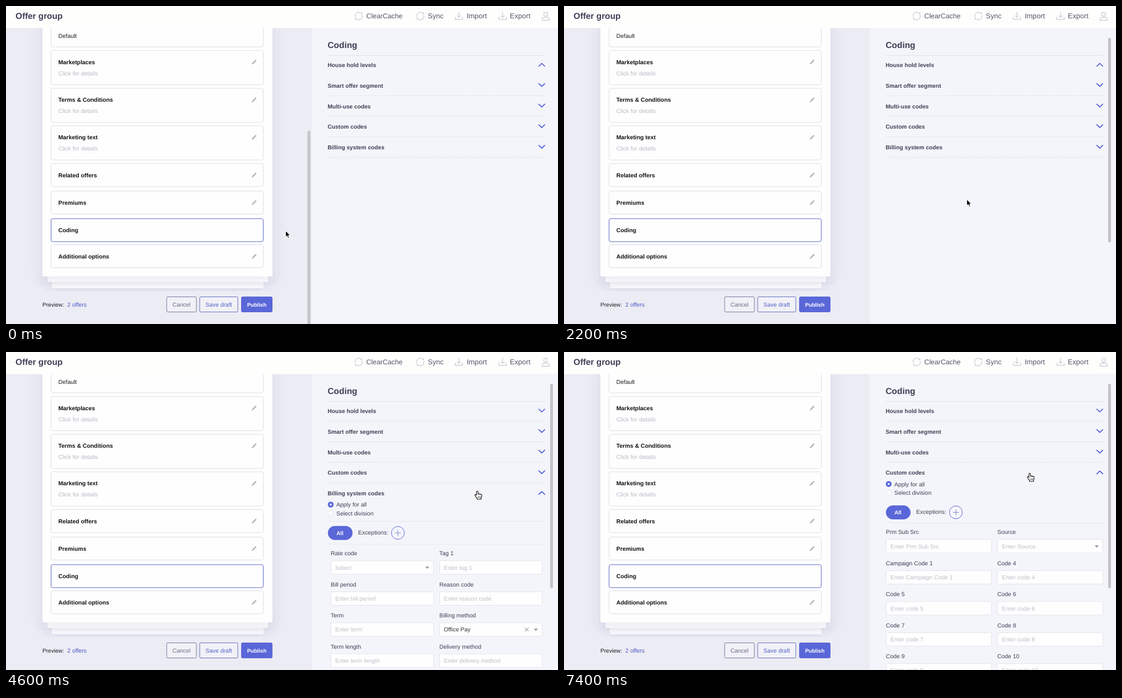
Write an HTML page that moves like this. It is 986 by 568 pixels and loops after 8 s.

```html
<!DOCTYPE html>
<html lang="en">
<head>
<meta charset="utf-8">
<title>Offer group</title>
<style>
html, body { margin: 0; height: 100%; overflow: hidden; }
svg { display: block; width: 986px; height: 568px; background: #ececf4; }
text { font: 10.4px "Liberation Sans", Arial, sans-serif; text-rendering: geometricPrecision; white-space: pre; }
.b { font-weight: bold; }
.mid { text-anchor: middle; }
.line { fill: none; stroke-linecap: round; stroke-linejoin: round; }
</style>
</head>
<body>
<svg viewBox="0 0 986 568">
  <defs>
    <filter id="shadow" x="-20%" y="-20%" width="140%" height="140%">
      <feDropShadow dx="0" dy="4" stdDeviation="12" flood-color="#50508c" flood-opacity=".13"/>
    </filter>
  </defs>
  <g id="page"></g>
  <g id="panel"></g>
  <rect id="bar" width="5" rx="2" fill="#c2c2c7"/>
  <path id="arrow" d="M0 0V11.2L2.6 8.8 4.3 12.8 6.3 12 4.6 8.2H8Z" fill="#000" stroke="#fff" stroke-width=".9"/>
  <g id="hand" stroke="#111" stroke-width="1.1" stroke-linejoin="round">
    <path fill="#fff" d="M-2 1.2C-2-.9.6-.9.7 1.2V5c.3-1 2.2-1 2.4.3.3-1 2-1 2.3.4.4-.8 2-.6 2 .9 0 3-.2 4-1.2 5.5V14H-1v-1.8C-2.5 10.5-4 9-4.8 7.3-5.4 5.8-3.6 5-2.6 6.2L-2 7Z"/>
    <path fill="none" stroke-width=".8" d="M.8 8.8v3M2.9 8.8v3M5 8.8v3"/>
  </g>
</svg>
<script>
const $ = id => document.getElementById(id);
const BLUE = '#5a67d8', INK = '#3f3f56', PALE = '#b9bac6';

const text = (x, y, s, fill = INK, cls = '', size = 10.4) =>
  `<text x="${x}" y="${y}" fill="${fill}" class="${cls}" style="font-size:${size}px">${s}</text>`;
const box = (x, y, w, h, stroke = 'none', fill = '#fefefe', r = 3, more = '') =>
  `<rect x="${x}" y="${y}" width="${w}" height="${h}" rx="${r}" stroke="${stroke}" fill="${fill}" ${more}/>`;
const line = (d, stroke, width = 1, more = '') =>
  `<path class="line" d="${d}" stroke="${stroke}" stroke-width="${width}" ${more}/>`;
const disc = (x, y, r, fill, stroke = 'none') =>
  `<circle cx="${x}" cy="${y}" r="${r}" fill="${fill}" stroke="${stroke}"/>`;
const rule = y => line(`M575 ${y}H963`, '#dfe0ea', 1, 'stroke-dasharray="1 1.6"');
const caret = (x, y) => `<path d="M${x - 3.5} ${y - 1.5}h7l-3.5 3.7z" fill="#8b8b92"/>`;

function pageMarkup() {
  const card = (y, h, title, hint) =>
    box(80.5, y, 379, h, title === 'Coding' ? '#5c69c4' : '#dedee6') +
    text(93.5, y + (hint ? 24 : 24.3), title, '#121216', 'b', 10.35) +
    (hint ? text(93.5, y + 44.3, 'Click for details', PALE) : '') +
    (title === 'Coding' ? '' : line(`M439.8 ${y + 24.3}l.6-1.8 5.4-5.6 1 1-5.6 5.6z`, '#b4b4bc', 1.3));
  const refresh = x => line(`M${x - 6} 19.5a6.2 6.2 0 0 1 10.4-6.2l1.2 1.2v-3M${x + 6} 16.5a6.2 6.2 0 0 1-10.4 6.2l-1.2-1.2v3`, PALE);
  const tray = x => line(`M${x} 11v9.5m-3.5-3.5l3.5 3.5 3.5-3.5M${x - 6.5} 20v4h13v-4`, PALE);
  const button = (x, w, label, stroke, ink, fill, cls = '', size) =>
    box(x, 519.5, w, 27, stroke, fill, 2) + text(x + w / 2, 537, label, ink, 'mid ' + cls, size);

  return box(82, 480, 378, 24, 'none', '#fafafc', 3, 'filter="url(#shadow)"') +
    box(74, 470, 394, 23, 'none', '#fcfcfd', 3, 'filter="url(#shadow)"') +
    box(65, 20, 411, 463, 'none', '#fefefe', 3, 'filter="url(#shadow)"') +
    box(80.5, 20, 379, 53, '#dedee6') + text(93.5, 56.7, 'Default', '#1c1c22') +
    card(79.5, 61, 'Marketplaces', 1) + card(147, 61, 'Terms &amp; Conditions', 1) +
    card(214, 61, 'Marketing text', 1) + card(281.5, 41, 'Related offers') +
    card(330.5, 41, 'Premiums') + card(379.9, 41, 'Coding') + card(426.6, 41, 'Additional options') +
    text(65, 537, 'Preview:', '#1c1c22', '', 10.1) + text(109.5, 537, '2 offers', '#4c59c4') +
    button(287, 53, 'Cancel', '#747b9e', '#6b6d85', '#f1f1f7') +
    button(346, 68, 'Save draft', '#6470c0', '#5360c4', '#f1f1f7') +
    button(420.5, 55, 'Publish', BLUE, '#fff', BLUE, 'b', 9.6) +
    box(545, 40, 441, 528, 'none', '#f4f5fa', 0) + line('M545 40V568', '#e3e4ee') +
    box(0, 0, 986, 39.5, 'none', '#fefefd', 0) +
    text(17, 23, 'Offer group', INK, 'b', 15.3) +
    refresh(630) + text(643.5, 21.5, 'ClearCache', '#55556a', '', 12.3) +
    refresh(740) + text(753.5, 21.5, 'Sync', '#55556a', '', 12.6) +
    tray(809) + text(823, 21.5, 'Import', '#55556a', '', 12.7) +
    tray(887) + text(900, 21.5, 'Export', '#55556a', '', 12.7) +
    disc(964, 14.7, 3.6, 'none', PALE) + line('M957.5 25v-1.5q0-3.5 4-3.5h5q4 0 4 3.5v1.5z', PALE) +
    text(574.5, 75, 'Coding', INK, 'b', 15.4) + line('M575 88.5H963', '#dfe0ea');
}

const sections = ['House hold levels', 'Smart offer segment', 'Multi-use codes', 'Custom codes', 'Billing system codes'];
const rowY = i => 105.3 + 36.7 * i;

// Each field: label, placeholder, kind
const forms = {
  3: [['Prm Sub Src', 'Enter Prm Sub Src'], ['Source', 'Enter Source', 'select'],
      ['Campaign Code 1', 'Enter Campaign Code 1'],
      ...[4, 5, 6, 7, 8, 9, 10].map(n => ['Code ' + n, 'Enter code ' + n])],
  4: [['Rate code', 'Select', 'select'], ['Tag 1', 'Enter tag 1'],
      ['Bill period', 'Enter bill period'], ['Reason code', 'Enter reason code'],
      ['Term', 'Enter term'], ['Billing method', 'Office Pay', 'chosen'],
      ['Term length', 'Enter term length'], ['Delivery method', 'Enter delivery method']]
};

function formMarkup(open) {
  const y = rowY(open), inset = open === 4 ? 5 : 0, top = y + (open === 4 ? 107.4 : 106.2);
  const fields = forms[open].map(([label, hint, kind], i) => {
    const right = i % 2, x = right ? 774 : 575 + inset, w = 189 - inset;
    const cy = top + 55.4 * (i >> 1), mid = cy + 25.4;
    return text(x, cy + 3.8, label) +
      box(x + .5, mid - 12, w - 1, 24, '#e4e5ec', '#fefefe', 2) +
      text(x + 8, mid + 3.7, hint, kind === 'chosen' ? '#33333c' : '#bfc0c9') +
      (kind ? caret(x + w - 11.5, mid) : '') +
      (kind === 'chosen' ? line(`M927 ${mid - 3}l6 6m0-6l-6 6`, '#77777f') : '');
  });
  return disc(580, y + 20.4, 5.2, BLUE) + disc(580, y + 20.4, 1.8, '#fff') +
    text(590, y + 24.2, 'Apply for all') +
    disc(580, y + 36, 4.8, '#fefefe', '#e1e2ea') + text(590, y + 39.8, 'Select division') +
    (open === 4 ? rule(y + 50.5) : '') +
    box(575, y + 58.6, 44, 25, 'none', BLUE, 12.5) + text(596.5, y + 75, 'All', '#fff', 'mid b', 9.8) +
    text(629, y + 73.7, 'Exceptions:') + disc(700, y + 71, 11.5, '#f6f7fc', BLUE) +
    line(`M695 ${y + 71}h10m-5-5v10`, '#7c86c8') +
    rule(y + (open === 4 ? 91 : 90)) + fields.join('');
}

function panelMarkup(open) {
  const shown = open ? sections.slice(0, open + 1) : sections;
  return shown.map((name, i) => {
    const y = rowY(i), up = i === open;
    return text(574.5, y + 3.8, name, INK, 'b', 10.2) +
      line(`M951.7 ${y + (up ? 2.2 : -3.3)}l5.3 ${up ? -5 : 5} 5.3 ${up ? 5 : -5}`, '#4956d4', 1.6) +
      (up ? '' : rule(y + 18.3));
  }).join('') + (open ? formMarkup(open) : '');
}

// Pointer path: time, x, y
const path = [[0, 499.5, 401.5], [200, 499.5, 401.5], [1200, 288.5, 394], [1400, 288.5, 394],
  [2200, 719.5, 345.5], [2600, 719.5, 345.5], [3600, 841.5, 250], [4200, 842.5, 249],
  [6000, 842.5, 249], [6800, 836, 226], [7400, 832.5, 217], [8000, 832.5, 217]];

function pointer(t) {
  const i = path.findIndex(p => p[0] > t), [a, ax, ay] = path[i - 1], [b, bx, by] = path[i];
  const k = (t - a) / (b - a), e = k * k * (3 - 2 * k);
  return [ax + (bx - ax) * e, ay + (by - ay) * e];
}

let current = -1;
function frame(now) {
  const t = Math.floor(now % 8000 / 200) * 200;
  const open = t >= 7400 ? 3 : t >= 4600 && t < 6000 ? 4 : 0;
  if (open !== current) $('panel').innerHTML = panelMarkup(current = open);

  const [x, y] = pointer(t), left = x < 545;
  const hot = left ? x < 460 && y > 380 && y < 421
    : sections.some((_, i) => Math.abs(y - rowY(i)) < 10);
  $('arrow').style.display = hot ? 'none' : '';
  $('hand').style.display = hot ? '' : 'none';
  $(hot ? 'hand' : 'arrow').setAttribute('transform', `translate(${x} ${y})`);

  // Only the hovered column shows its scrollbar
  const bar = $('bar');
  bar.setAttribute('x', left ? 538.5 : 972);
  bar.setAttribute('y', left ? 223 : 57);
  bar.setAttribute('height', left ? 350 : 365);
  requestAnimationFrame(frame);
}

$('page').innerHTML = pageMarkup();
const start = performance.now();
requestAnimationFrame(function loop() { frame(performance.now()); });
</script>
</body>
</html>
```
